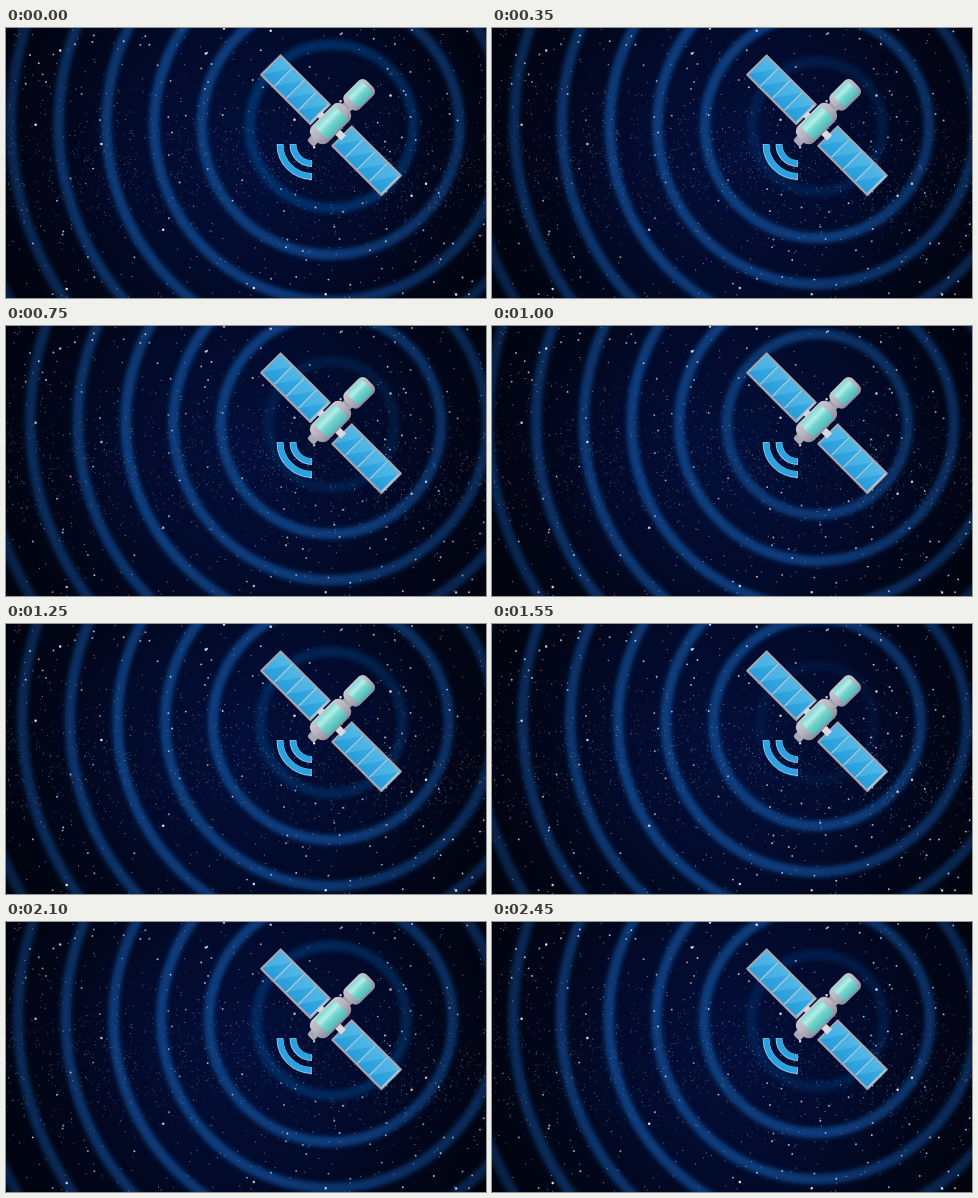
Write an HTML page that moves like this. It is 480 px wide and 270 px high and loops after 2500 ms.

```html
<!DOCTYPE html>
<html lang="en">
<head>
<meta charset="utf-8">
<title>Satellite signal</title>
<style>
html, body { margin: 0; width: 100%; height: 100%; overflow: hidden; background: #01040f; }
svg { display: block; width: 100vw; height: 100vh; }
</style>
</head>
<body>
<svg viewBox="0 0 480 270" preserveAspectRatio="none">
  <defs>
    <radialGradient id="sky" gradientUnits="userSpaceOnUse" cx="245" cy="125" r="270">
      <stop offset="0" stop-color="#030f3a"/>
      <stop offset=".5" stop-color="#020a2a"/>
      <stop offset="1" stop-color="#010410"/>
    </radialGradient>
    <radialGradient id="shade" gradientUnits="userSpaceOnUse" cx="245" cy="125" r="280">
      <stop offset=".45" stop-color="#01030d" stop-opacity="0"/>
      <stop offset="1" stop-color="#01030d" stop-opacity=".5"/>
    </radialGradient>
    <linearGradient id="cell" x1="0" y1="0" x2="0" y2="1">
      <stop offset="0" stop-color="#3cade2"/>
      <stop offset="1" stop-color="#279ddb"/>
    </linearGradient>
    <linearGradient id="metal">
      <stop offset="0" stop-color="#c9c8d0"/>
      <stop offset=".5" stop-color="#b5b3bf"/>
      <stop offset="1" stop-color="#8d8b9b"/>
    </linearGradient>
    <linearGradient id="teal">
      <stop offset="0" stop-color="#7fdcd6"/>
      <stop offset=".3" stop-color="#b4eee6"/>
      <stop offset=".55" stop-color="#74d5cf"/>
      <stop offset="1" stop-color="#4fbaba"/>
    </linearGradient>
    <filter id="soft" filterUnits="userSpaceOnUse" x="-20" y="-20" width="520" height="310">
      <feGaussianBlur stdDeviation="2.3"/>
    </filter>
  </defs>
  <rect width="480" height="270" fill="url(#sky)"/>
  <g id="rings" fill="none" stroke="#0a4083" stroke-width="10.5" filter="url(#soft)"/>
  <rect width="480" height="270" fill="url(#shade)"/>
  <g id="stars"/>
  <g fill="none">
    <path d="M274 116A32 32 0 0 0 306 148.5M287 116A19 19 0 0 0 306 135.5" stroke="#8fcdec" stroke-width="6.8"/>
    <path d="M274.2 116.4A31.8 31.8 0 0 0 305.6 148.1M287.2 116.4A18.8 18.8 0 0 0 305.6 135.1" stroke="#2ba1df" stroke-width="5.6"/>
  </g>
  <g transform="translate(275 27) rotate(45)">
    <g id="panels"/>
    <rect x="69" y="11" width="34" height="7" fill="#d9d8e0"/>
    <rect x="78.5" y="33" width="9.5" height="9" rx="2.5" fill="#a9a7b3"/>
    <rect x="78" y="-14" width="11" height="10" fill="#a3a1ae"/>
    <rect x="72" y="-9" width="23" height="45" rx="8" fill="url(#metal)"/>
    <rect x="74" y="-2" width="19" height="29" rx="4" fill="url(#teal)"/>
    <rect x="73" y="-42.5" width="21" height="31" rx="6" fill="url(#metal)"/>
    <rect x="75" y="-38.5" width="17" height="21" rx="3" fill="url(#teal)"/>
  </g>
</svg>
<script>
const LOOP = 2500, GAP = 47, CX = 325.5, CY = 98.5;
const $ = id => document.getElementById(id);

function add(parent, tag, attrs) {
  const el = document.createElementNS("http://www.w3.org/2000/svg", tag);
  for (const key in attrs) el.setAttribute(key, attrs[key]);
  parent.appendChild(el);
  return el;
}

let seed = 71;
function rnd() {
  seed = (seed * 16807) % 2147483647;
  return seed / 2147483647;
}

// Solar panels: a metal frame with four cells, each with a slanted glint
for (const x of [-1, 99.5]) {
  add($("panels"), "rect", { x, y: -.5, width: 71.5, height: 29.5, rx: 1, fill: "#a5a6b3" });
  for (let i = 0; i < 4; i++) {
    const left = x + 2 + i * 17, right = left + 16.5;
    add($("panels"), "rect", { x: left, y: 1.7, width: 16.5, height: 25.1, fill: "url(#cell)" });
    add($("panels"), "path", { d: `M${left} 1.7H${right}L${left} 26z`, fill: "#8fd6f4", opacity: .25 });
    add($("panels"), "path", { d: `M${right} 1.7v25`, stroke: "#b4cbd9", "stroke-width": 1.4 });
  }
}

function starPath(count, spot) {
  let d = "";
  for (let i = 0; i < count; i++) {
    const [x, y] = spot();
    d += `M${x.toFixed(1)} ${y.toFixed(1)}h.01`;
  }
  return d;
}
const anywhere = () => [rnd() * 480, rnd() * 270];
const band = () => [rnd() * 480, 138 + (rnd() + rnd() + rnd() - 1.5) * 70];

const layers = [];
function layer(count, spot, size, color, alpha) {
  const el = add($("stars"), "path", {
    d: starPath(count, spot), stroke: color, "stroke-width": size, "stroke-linecap": "round"
  });
  layers.push({ el, alpha, turns: 2 + layers.length % 4, shift: layers.length * 1.7 });
}
for (let i = 0; i < 4; i++) {
  layer(270, band, 1.1, "#8794b4", .55);
  layer(85, anywhere, 1.3, "#a9b8d8", .65);
  layer(28, anywhere, 1.9, "#dce6fb", .85);
}
layer(20, anywhere, 2.5, "#ffffff", .9);

const rings = Array.from({ length: 9 }, () => add($("rings"), "circle", {}));

// Distance travelled by the waves at a few moments
const travel = [[0, 35], [350, 65], [750, 110], [1250, 165], [1800, 225], [2100, 263], [2450, 301], [2500, 307]];

function phase(t) {
  const i = travel.findIndex(p => p[0] > t);
  const [t0, a] = travel[i - 1], [t1, b] = travel[i];
  return a + (b - a) * (t - t0) / (t1 - t0);
}

const strength = r => .92 * Math.min(1, Math.max(0, (r - 48) / 48));

function draw(t) {
  const start = phase(t) % GAP;
  rings.forEach((ring, i) => {
    const r = start + i * GAP;
    // Wide waves lean slightly to the upper left
    const lean = Math.max(0, r - 80) * .015;
    ring.setAttribute("cx", (CX - lean).toFixed(2));
    ring.setAttribute("cy", (CY - lean).toFixed(2));
    ring.setAttribute("r", r.toFixed(2));
    ring.setAttribute("opacity", strength(r).toFixed(3));
  });
  for (const s of layers) {
    const wave = Math.sin(t / LOOP * s.turns * 2 * Math.PI + s.shift);
    s.el.setAttribute("opacity", (s.alpha * (.88 + .12 * wave)).toFixed(3));
  }
}

const begin = performance.now();
function tick() {
  const t = (performance.now() - begin) % LOOP;
  draw(Math.floor(t / 50) * 50);
  requestAnimationFrame(tick);
}
tick();
</script>
</body>
</html>
```
